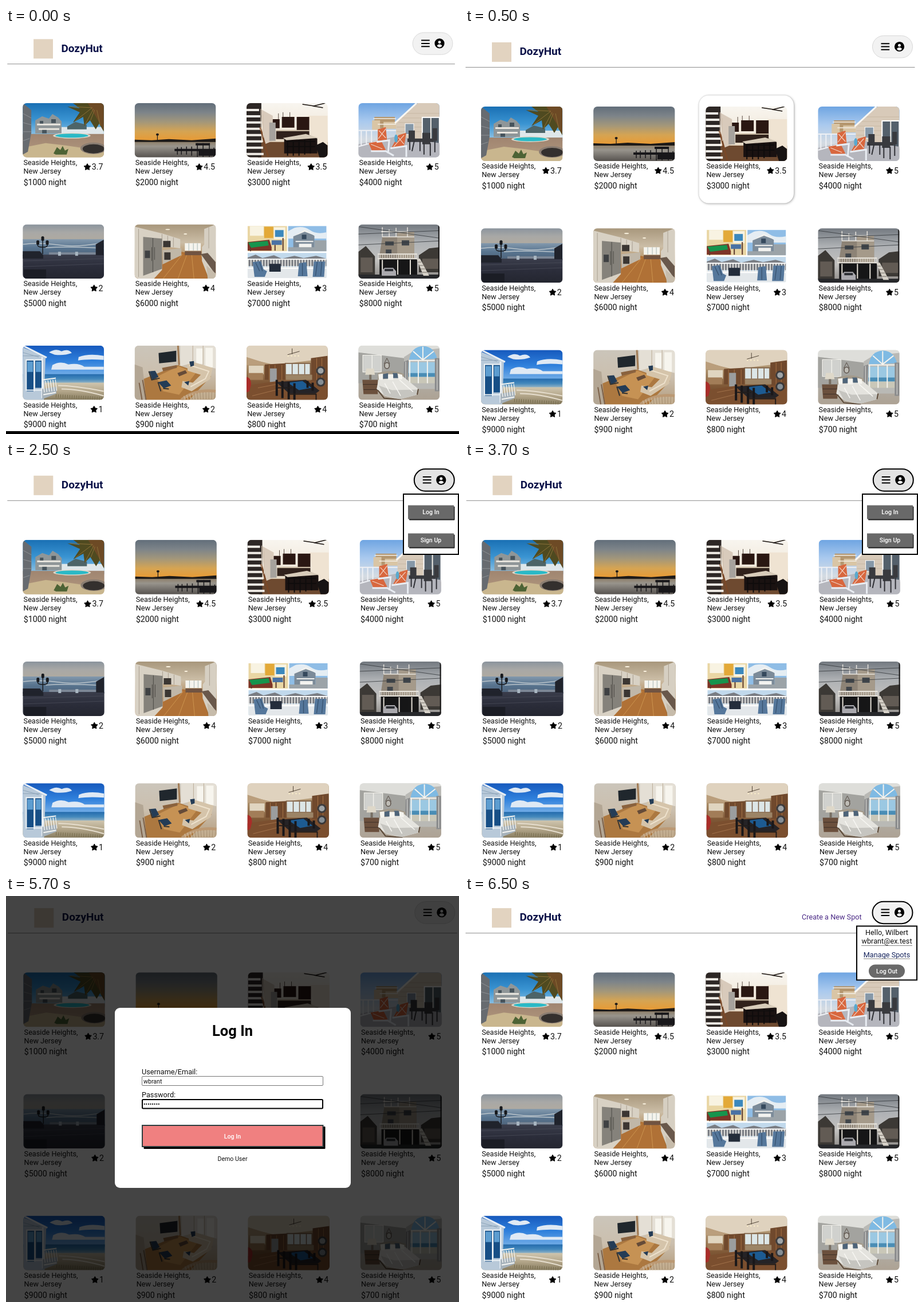
An HTML page that plays this animation: 791 by 708 pixels, repeating every 8 s.

```html
<!DOCTYPE html>
<html lang="en">
<head>
<meta charset="utf-8">
<title>DozyHut</title>
<style>
html, body { margin: 0; width: 100%; height: 100%; overflow: hidden; background: #fff; }
svg { display: block; }
text { font-family: Roboto, sans-serif; font-size: 12.7px; fill: #111; }
.price { font-size: 14.2px; }
.small { font-size: 10.6px; }
.white { fill: #fff; font-weight: 500; }
.mid { text-anchor: middle; }
.end { text-anchor: end; }
.brand { font-size: 19px; font-weight: 700; fill: #0a1148; }
.title { font-size: 25.5px; font-weight: 700; fill: #000; }
.visited { fill: #4b2a86; }
.link { fill: #14235c; }
.card { fill: #fff; filter: drop-shadow(1.5px 1.5px 2px #0004) drop-shadow(0 0 1px #0003); }
.menu { fill: #fff; stroke: #000; stroke-width: 2; }
</style>
</head>
<body>
<svg id="stage" width="791" height="708" viewBox="0 0 791 708"></svg>
<script>
let gradients = 0;
const p = (fill, d) => `<path fill="${fill}" d="${d}"/>`;
const l = (stroke, width, d, dash = '') =>
  `<path fill="none" stroke="${stroke}" stroke-width="${width}" stroke-dasharray="${dash}" d="${d}"/>`;
const box = (x, y, w, h, fill, r = 0, extra = '') =>
  `<rect x="${x}" y="${y}" width="${w}" height="${h}" rx="${r}" fill="${fill}" ${extra}/>`;
const oval = (x, y, rx, ry, fill) => `<ellipse cx="${x}" cy="${y}" rx="${rx}" ry="${ry}" fill="${fill}"/>`;
const text = (x, y, s, cls = '') => `<text x="${x}" y="${y}" class="${cls}">${s}</text>`;
// Full-width band with evenly spaced vertical colour stops
const band = (y, h, ...colors) => {
  const id = 'g' + gradients++;
  const stops = colors.map((c, i) => `<stop offset="${i / (colors.length - 1)}" stop-color="${c}"/>`);
  return `<linearGradient id="${id}" x2="0" y2="1">${stops.join('')}</linearGradient>` +
    box(0, y, 142.5, h, `url(#${id})`);
};

const pool = () => band(0, 60, '#1a70b4', '#3a94d2', '#9ac8e6') +
  p('#dfe7ea', 'M62 42H142V56H62Z') + p('#4d6468', 'M78 41L92 33L112 38V46H78Z') +
  p('#8f9698', 'M22 30L34 23L46 27L52 19L62 25L68 32V53H22Z') + p('#e9e6df', 'M25 36H66V39H25ZM28 44H64V47H28Z') +
  p('#47545c', 'M30 31H36V36H30ZM50 28H58V35H50ZM34 47H42V53H34Z') +
  band(54, 41, '#a08570', '#a98f78', '#c2ac84') + oval(86, 57, 33, 5, '#ded6c8') + oval(86, 57, 29, 3.5, '#2ab9c6') +
  p('#c9b68e', 'M0 78L40 70L75 74L142 84V95H0Z') + oval(124, 79, 23, 10, '#8a7d72') + oval(124, 80, 19, 8, '#34302e') +
  p('#4d6335', 'M54 88L60 77L66 82L70 75L74 83L80 80L77 90H58Z') +
  p('#676b70', 'M0 0L15 12V52L9 85L0 90Z') + l('#8d9094', 1, 'M0 18L15 26M0 34L15 38M0 50H15M0 66L12 62') +
  p('#4f4a20', 'M78 6L100 9L88 0H142V50L134 36L128 46L118 30L108 40L106 24L88 34L100 16Z') +
  p('#6d4a25', 'M114 0H142V48L132 30L126 20Z') + l('#8b7038', 1, 'M122 8L82 6M122 8L92 31M124 10L109 38M126 12L119 30M130 12L136 40');

const sunset = () => band(0, 66, '#626e7a', '#7d8489', '#a3977a', '#d5a453', '#e99a33') +
  band(66, 29, '#8b7a62', '#98948c', '#77736e', '#57534f') +
  p('#1d1a18', 'M0 64L30 65L60 63L100 65L142 62V68H0Z') + l('#1d1a18', 1.2, 'M40 65V55') + oval(40, 55, 2.5, 2, '#1d1a18') +
  p('#18171a', 'M107 70H132V74H107ZM70 80H142V84H70ZM112 84H142V92H112Z') +
  l('#18171a', 1.5, 'M75 77V90M82 77V90M91 76V90M100 76V92M110 70V94M120 70V94M131 70V94M139 78V94');

const darkKitchen = () => band(0, 95, '#f8f5ef', '#f1e8da', '#d8c3a4') +
  p('#6e4a30', 'M24 68H142V95H20Z') + p('#efe3d2', 'M108 22H142V74H118Z') +
  p('#d8cabb', 'M24 10L46 22V66L32 72Z') +
  box(0, 0, 26, 95, '#2d2725') + l('#efebe5', 4, 'M0 12H22M0 23H24M0 34H26M0 45H26M0 56H27M0 67H28M0 78H29M0 89H30') +
  l('#794828', 3, 'M24 42L38 94') + l('#d0c0ad', 1, 'M25 10V48M29 20V60') +
  p('#2a1712', 'M46 28H58V44H46ZM62 24H84V43H62ZM88 24H110V48H88Z') +
  box(40, 34, 11, 32, '#a6a29d') + box(52, 49, 58, 14, '#30211b') + box(52, 47, 58, 2, '#c7b7a0') +
  p('#1a1211', 'M66 62L108 55L124 62V88H66Z') + p('#d8ccba', 'M64 61L104 54L126 61L70 65Z') +
  l('#0f0c0c', 2, 'M72 66V92M82 66V92M92 65V92M102 64V90M112 63V88M70 67H120M70 76H120') +
  p('#171313', 'M121 74L134 68L142 74V95H128Z') + l('#17110e', 1.5, 'M98 2L118 5L138 0M116 5L134 8') + l('#33231a', .8, 'M64 16V30M76 16V28M56 18V28');

const deck = () => band(0, 95, '#6fa5e2', '#a9c9ee', '#d4dbe2', '#bfc0c4') +
  p('#b5976f', 'M28 24H64V44H28Z') + p('#d9c5a5', 'M24 30H38V47H24ZM44 33H70V45H44Z') + l('#f4f0e8', 1.5, 'M26 27H66M34 37H68') +
  p('#d8cab9', 'M66 34L104 0H142V80H66Z') + l('#c4b4a0', .8, 'M84 18H142M76 26H142M70 34H142M67 42H142M67 50H142') +
  l('#faf7f2', 3, 'M64 35L102 0') + box(82, 36, 15, 19, '#8698a8', 0, 'stroke="#fff"') + box(112, 25, 30, 47, '#54606b', 0, 'stroke="#fff" stroke-width="2"') +
  l('#f1eee8', 2, 'M127 25V72') + p('#b5b6bd', 'M0 72L68 58L142 70V95H0Z') +
  l('#eef0f4', 2, 'M0 48L66 48M0 76L36 66M5 47V74M14 47V72M23 48V70') +
  p('#d8673e', 'M34 46L48 42L50 64L34 66ZM70 56L84 52L80 76L58 78ZM18 70L40 66L48 82L24 84Z') +
  l('#f1d4c6', 1.2, 'M36 48L48 61M48 45L35 62M70 60L80 72M80 56L62 76M22 72L42 80') +
  l('#e9edf3', 3, 'M32 68L54 65L52 88M22 84L48 84L62 92M56 79L84 75V94') + oval(66, 62, 3, 7, '#59a9ce') +
  p('#393a3e', 'M88 48H99V66H88ZM112 52H126V72H112ZM130 44H138V66H130ZM86 62H132V68H86Z') +
  l('#303136', 2, 'M90 64V82M98 66L94 84M108 66V84M115 70V90M126 70V92M134 66V86');

const waterfront = () => band(0, 28, '#8b949d', '#a8a8a6', '#b0aaa0') +
  band(26, 30, '#8399ad', '#58748f', '#4e637a') + l('#b9c3ca', 1.5, 'M0 35Q30 31 62 36T142 32M40 41Q80 38 142 42') +
  p('#7c8796', 'M46 49H140V54H46Z') + band(53, 42, '#3a3d4b', '#2b2d3a', '#242630') +
  p('#20232c', 'M0 47L30 47L36 54V60H0ZM128 35L142 27V54H128Z') + l('#4a4c58', .8, 'M0 64L142 60M0 74L142 69') +
  box(2, 79, 39, 16, '#1b1d25') + box(62, 48, 5, 7, '#a9b6c1') + box(92, 48, 5, 7, '#a9b6c1') +
  l('#17191d', 1.5, 'M35 24V52M26 36Q26 40 35 40T43 36') + box(24, 28, 5, 8, '#17191d', 2) + box(32.5, 21, 5, 8, '#17191d', 2) + box(40.5, 28, 5, 8, '#17191d', 2);

const woodKitchen = () => band(0, 95, '#a8977c', '#cbbda6', '#b0844f', '#9a652d') +
  p('#b07136', 'M46 64L82 48L116 54L128 95H34Z') + l('#cc944f', 1, 'M84 52L50 95M92 52L76 95M100 52L104 95') +
  p('#d8d1c4', 'M0 4L48 16L80 26V42L48 38V80L34 95H0Z') + l('#a99f90', 1, 'M7 8V92M48 17V38M58 20V39M68 23V40') +
  p('#85827b', 'M15 22L48 25V78L15 90Z') + l('#54524d', 1.2, 'M32 24V84M30 40V64M35 40V62') + box(18, 46, 9, 13, '#3f4143') +
  p('#c0b7a8', 'M49 45L82 42V54L49 70Z') + p('#3b3632', 'M50 29H63V40H50ZM52 49H63V62H52Z') +
  p('#f4f3ed', 'M88 33H116V46H88Z') + l('#a8b7b6', 1, 'M95 33V46M103 33V46M110 33V46') +
  box(88, 47, 29, 7, '#705341') + p('#d6cfc2', 'M122 8L142 0V95H130L118 64V40L122 35Z') +
  l('#aaa092', 1, 'M130 5V42') + p('#69584b', 'M116 52L128 50L142 66V88Z') + p('#c6bbaa', 'M126 72L142 86V95H128Z') +
  oval(58, 9, 4, 1, '#fff7e4') + oval(89, 17, 3, 1, '#fff7e4');

const collage = () => box(0, 0, 142.5, 95, '#fff') +
  box(2, 3, 69, 44, '#e9d6a4') + p('#f8f3e2', 'M6 3H30V20H6ZM48 5H68V26H48Z') + p('#e3a938', 'M31 4H47V24H31Z') +
  box(50, 10, 15, 12, '#3b88bd') + p('#7d3528', 'M2 31L40 27L44 40V46H2Z') + p('#16944d', 'M3 32L37 29L39 37L8 41Z') +
  p('#4a72a4', 'M44 28H62V36H44Z') + l('#5c392d', 2, 'M50 36V46M64 24V46M7 40V47') +
  box(73, 3, 67, 44, '#8fbde6') + p('#e5edf3', 'M84 6Q100 2 111 10T140 14V25H73V12Z') + p('#7c8b99', 'M82 21L102 10L119 20V42H82Z') +
  p('#f2f2ef', 'M80 22L102 9L121 20L102 13ZM86 29H117V31H86ZM92 34H114V43H92Z') + box(97, 18, 8, 8, '#36495d') + p('#9ba3a8', 'M119 28H140V40H119ZM73 40H140V47H73Z') +
  box(2, 50, 138, 44, '#c1d9ec') + p('#7a7d83', 'M2 58L16 53L28 59L48 54L62 60L84 55L100 59L122 55L140 60V73H2Z') + p('#e3e7ea', 'M2 74H140V94H2Z') +
  l('#fff', 2, 'M2 61H140M2 77H140') + l('#f6f5f0', 15, 'M2 69H140', '1.6 3.4') +
  p('#242d3b', 'M40 69H60V83H40Z') + p('#55779b', 'M11 66L25 64L30 79L36 82L32 92H14ZM92 68L105 66L107 91H90ZM118 65L138 65L136 92H116Z') +
  l('#354f6c', 1.2, 'M16 67L23 82M23 66L28 82M98 68V90M124 66L121 90M132 66L130 90');

const stiltHouse = () => band(0, 95, '#737980', '#aeb1b4', '#c2c1bf', '#8c8986') +
  p('#3c3935', 'M0 48L13 38L29 56V90H0ZM106 54L124 42L142 40V84H106Z') + p('#625b54', 'M4 58H25V84H4ZM112 60H142V78H112Z') +
  p('#8d8376', 'M42 22H98V62H37V54Z') + p('#a59a8a', 'M68 13H98V62H68Z') + l('#e7e3dc', 1.5, 'M42 22H98M40 13H87M42 5V22M54 9V22M66 6V22M86 5V22') +
  p('#40454a', 'M47 30H62V37H47ZM76 28H89V37H76ZM48 44H58V53H48Z') + p('#161617', 'M37 61H103V95H37Z') +
  l('#ece8df', 2, 'M34 60H103M34 52H103') + l('#ded9d0', 8, 'M34 56H103', '1 3') + l('#e4dfd6', 2, 'M42 62V92M69 62V88M91 62V90') +
  p('#27282b', 'M0 88H142V95H0Z') + p('#aaa9ae', 'M41 81L46 76H61L66 82V90H41Z') + box(46, 78, 15, 4, '#2b2d32') +
  p('#d6d1c8', 'M102 60L108 60L124 90H114Z') + l('#756e66', 1, 'M104 66H110M106 72H114M109 78H117M112 84H120') +
  l('#33363a', .8, 'M0 4L142 24M0 17L142 11M0 36L142 29') + l('#1c1b1b', 2, 'M141 2V94');

const beachHouse = () => band(0, 54, '#1659bd', '#2f80dc', '#7ab2e8') +
  p('#dfe9f4', 'M46 12Q58 4 68 10Q80 5 86 13Q72 18 56 16ZM98 20Q116 13 142 18V25Q114 23 97 26ZM52 34Q66 26 80 33Q98 30 108 37L142 37V42H50Z') +
  band(50, 17, '#246bad', '#4388bc', '#a5bdc7') + band(65, 30, '#cfc5ae', '#b3a68a', '#877c60') +
  l('#e6dece', 2, 'M62 70Q90 70 142 80M68 76Q100 76 142 88') + l('#776d4d', 6, 'M58 88L142 93', '1 3') +
  p('#b8c9d9', 'M0 3L40 20L37 95H0Z') + l('#e8eef4', 3, 'M0 0L42 21M34 20V92') + l('#8da4b9', 1, 'M0 12L28 20M0 18H30') +
  p('#174f86', 'M7 26H19V80H7ZM22 26H33V74H22Z') + p('#5d9dd0', 'M8 28H18V46H8ZM23 28H32V46H23Z') + l('#edf2f5', 2, 'M6 25H34V78H6ZM20 25V80') +
  p('#a6b2bb', 'M34 76L59 72V84L34 94Z') + l('#f5f5f2', 2, 'M35 60L58 57M36 86L58 82') + l('#f5f5f2', 20, 'M36 72L59 69', '1.4 3');

const loft = () => band(0, 95, '#cbc5ba', '#cbbfae', '#b39c7d') +
  p('#e4dfd5', 'M80 0H142V40L100 31L80 36Z') + p('#ac7840', 'M12 60L76 34L134 54L96 95H20Z') + p('#c69254', 'M38 55L77 36L107 48L78 86L50 80Z') +
  p('#b3a694', 'M0 33L14 38L20 95H0Z') + l('#a17b55', 3, 'M76 0L78 34') + l('#b9aa94', 1, 'M102 0V32M120 0V36') + p('#f7f5ee', 'M108 5H119V32H108ZM124 4H137V38H124Z') +
  p('#20272d', 'M42 13L73 9V28L43 31Z') + p('#8a623e', 'M48 39L74 34V39L50 45Z') +
  p('#d5c4aa', 'M92 33L104 29L137 39L132 59L100 80L82 73L84 62L102 65L116 51L93 44Z') + l('#eee2cd', 2, 'M96 34L130 45L124 58L98 72') +
  p('#243c56', 'M96 28L104 27L104 35L98 37ZM87 64L96 62L94 70ZM26 45L36 44L42 55L31 60ZM41 64L56 61L64 70L51 75Z') +
  l('#343331', 2, 'M25 45L30 60L44 57M41 64L46 80M50 75L60 76') + p('#654b38', 'M75 48L89 43L92 48L78 54Z') +
  l('#bb9974', 5, 'M82 95Q106 76 142 80') + l('#d4c0a2', 12, 'M88 94Q108 86 142 88', '1 4') + l('#7c6048', 2, 'M14 60L20 95M8 65L13 95');

const dining = () => band(0, 95, '#c9bba5', '#b0946f', '#7f5836', '#5d3f2b') +
  p('#dfd2be', 'M0 0H142V20L112 26L50 34L0 22Z') + p('#ba9e7c', 'M0 20L44 34H0Z') +
  p('#70492d', 'M32 33L68 31V60H32ZM113 22L142 18V72H113Z') + l('#a57346', 1, 'M40 34V60M50 34V60M62 34V60M123 22V68M132 22V68') +
  p('#e0d5c0', 'M4 35H30V50H4Z') + box(3, 48, 26, 12, '#a27d58') + box(41, 40, 12, 24, '#9b9d9e') + p('#dce6e7', 'M69 32H111V50H69Z') +
  l('#795b42', 1.5, 'M68 31H112V51H68ZM80 32V50M91 32V50M102 32V50') + box(69, 51, 46, 9, '#9c8466') +
  p('#7b4f2f', 'M0 70L56 62H142V95H0Z') + l('#a1714a', 1, 'M20 74L62 66M10 88L58 76') +
  p('#252326', 'M52 64L104 60L128 79L121 84H75Z') + p('#1d5b92', 'M72 65L98 62L114 74L92 78Z') +
  l('#191719', 4, 'M53 60V88M63 62V92M74 64V94M84 66V95M107 62V74M116 65V79') + l('#211c1b', 2, 'M55 74H80M76 85H122V95') +
  oval(130, 44, 8, 8, '#3d3c3d') + oval(130, 44, 5, 5, '#a0a4a6') + oval(130, 64, 8, 8, '#393738') + oval(130, 64, 5, 5, '#858d93') +
  p('#a92d29', 'M0 55Q8 56 8 68L5 80L0 82Z') + l('#514537', 1, 'M80 5V15M72 16L93 10') + l('#fff2cc', 2, 'M72 18H92', '2 4');

const bedroom = () => band(0, 95, '#cfd0cd', '#b3b1aa', '#ada294') +
  p('#dededa', 'M0 0H142V6L96 14L80 23L0 12Z') + p('#a3a39f', 'M0 12L80 22V66H0Z') + p('#d0d1ce', 'M9 18H39V45H9Z') +
  l('#f0efea', 1.5, 'M8 17H40V46H8ZM24 17V46') + p('#b9b9b5', 'M80 20L96 10L142 5V76H80Z') +
  p('#7fbae3', 'M89 25Q92 2 114 1Q133 2 138 23Z') + p('#9bc8e2', 'M88 29H136V64H88Z') + p('#4a8db5', 'M88 48H136V55H88Z') + p('#c9c7b8', 'M88 55H136V66H88Z') +
  l('#f4f3ee', 2, 'M88 26H138M90 27V66M105 27V66M121 27V66M136 27V66M113 25V2M113 25L96 10M113 25L132 10') +
  p('#8b8c8d', 'M80 28L88 25L86 68H79ZM134 22H142V80H134Z') + l('#e0dfda', 1, 'M83 28V67M138 24V78') +
  oval(50, 35, 5, 6, '#5b5149') + oval(50, 35, 3.5, 4.5, '#bebcb5') + l('#5b5149', 1, 'M45 32L50 22L55 32') +
  p('#6b503d', 'M7 60H34V85H9Z') + l('#3e3028', 1, 'M8 68H34M9 77H34') + p('#ded8c9', 'M14 40H27L29 51H12Z') + box(19, 51, 4, 9, '#776e62') +
  p('#a39a8b', 'M34 48Q58 40 80 50V69H34Z') + p('#e4e3de', 'M35 60L78 54L105 76L103 86L72 94L46 88L32 76Z') + p('#c6c5c0', 'M36 70L59 78L104 77L102 86L72 94L45 87Z') +
  p('#4e6479', 'M43 50L52 48L53 58H43ZM60 48L68 48L70 57H61Z') + p('#f5f4ef', 'M35 50L43 49V60H36ZM52 50H61V60H52ZM69 49L77 51V59H70Z') +
  l('#f8f7f3', 1.5, 'M46 66L56 84M60 63L74 88M72 60L96 81') + l('#5b4938', 2, 'M34 78L45 92L75 95M103 86L105 76');

const spots = [
  [pool, '3.7', 1000], [sunset, '4.5', 2000], [darkKitchen, '3.5', 3000], [deck, '5', 4000],
  [waterfront, '2', 5000], [woodKitchen, '4', 6000], [collage, '3', 7000], [stiltHouse, '5', 8000],
  [beachHouse, '1', 9000], [loft, '2', 900], [dining, '4', 800], [bedroom, '5', 700]
];

const star = (x, y) => {
  const pts = Array.from({ length: 10 }, (_, i) => {
    const r = i % 2 ? 3.1 : 5.8, a = i * Math.PI / 5;
    return `${(x + r * Math.sin(a)).toFixed(2)},${(y - r * Math.cos(a)).toFixed(2)}`;
  });
  return `<polygon points="${pts.join(' ')}" stroke="#000" stroke-width="1.2" stroke-linejoin="round"/>`;
};

const spot = ([photo, rating, price], i) =>
  `<g transform="translate(${28 + i % 4 * 196.1} ${137 + (i >> 2) * 212.2})">
    <g clip-path="url(#round)">${photo()}</g>` +
  text(1.3, 108.4, 'Seaside Heights,') + text(1.3, 123.4, 'New Jersey') +
  text(1.5, 143.2, `$${price} night`, 'price') + text(140.8, 116.7, rating, 'price end') +
  star(rating.length > 1 ? 113.2 : 125, 112) + '</g>';

const pill = box(711.5, 13.5, 70, 38.5, '#f2f2f2', 19.25, 'id="pill"') +
  l('#000', 2, 'M726.5 27.2H741.2M726.5 32.5H741.2M726.5 37.8H741.2') + oval(758.5, 32.5, 8.6, 8.6, '#000') +
  oval(758.5, 30.3, 2.5, 2.5, '#f2f2f2') +
  p('#f2f2f2', 'M753.9 36.8Q755.2 34.1 757.2 34.1H759.8Q761.8 34.1 763.1 36.8Q758.5 41.8 753.9 36.8Z');

const page = box(408.5, 117.5, 165.5, 188, '#fff', 17, 'id="hover" class="card"') +
  box(47, 25, 34, 34, '#e2d3c0') + text(95.5, 47.2, 'DozyHut', 'brand') +
  l('#8c8c8c', 1, 'M1 68.5H785.5') + pill + spots.map(spot).join('');

const menuButton = (y, label) => box(704, y + 2, 79.5, 24, '#222', 1) + box(702, y, 80, 24, '#696969') +
  text(742, y + 15.5, label, 'small white mid');

const guestMenu = box(694, 56, 96, 105, '#fff', 0, 'class="menu"') + menuButton(75.5, 'Log In') + menuButton(124.5, 'Sign Up');

const login = box(0, 0, 791, 708, '#000b') + box(190, 195, 412, 314, '#fff', 9) +
  text(395.5, 244, 'Log In', 'title mid') + text(237, 311, 'Username/Email:') + text(237, 351, 'Password:') +
  box(237.5, 314.5, 316, 16, '#fff', 1.5, 'stroke="#767676"') + text(240, 326.5, 'wbrant', 'small') +
  box(238, 355, 315, 15.5, '#fff', 1.5, 'stroke="#000" stroke-width="2"') + text(240, 366.8, '•'.repeat(8), 'small') +
  box(240.5, 402, 317, 39, '#000', 1) + box(238, 400, 315.5, 37, '#f08080', 0, 'stroke="#2f3f40" stroke-width="2"') +
  text(395.5, 422.5, 'Log In', 'small white mid') + text(395.5, 462, 'Demo User', 'small mid');

const userMenu = text(588, 41.2, 'Create a New Spot', 'visited') +
  box(684, 52.5, 105, 94, '#fff', 0, 'class="menu"') + text(736.5, 68, 'Hello, Wilbert', 'mid') +
  text(736.5, 83, 'wbrant@ex.test', 'mid') + text(736.5, 107, 'Manage Spots', 'mid link') +
  l('#888', 1, 'M692 86.5H781M696 109.5H777') + box(705, 119.5, 63, 23, '#696969', 11.5) +
  text(736.5, 135, 'Log Out', 'small white mid');

const plain = ['#f2f2f2', '#d8d8d8', 1];
const scenes = [
  { end: 500, at: 'translate(1.3 -5.5) scale(.9963)', pill: plain, over: box(0, 703, 791, 5, '#000') },
  { end: 2500, at: '', pill: plain, over: '', hover: true },
  { end: 4500, at: 'translate(1.3 -1.2)', pill: ['#e3e3e3', '#000', 2], over: guestMenu },
  { end: 6500, at: 'translate(2.3 -3.8)', pill: plain, over: login },
  { end: 8000, at: 'translate(0 -3.8)', pill: ['#f2f2f2', '#000', 2], over: userMenu }
];

const $ = id => document.getElementById(id);
$('stage').innerHTML = `<clipPath id="round">${box(0, 0, 142.5, 95, '#000', 7)}</clipPath><g id="page">${page}</g><g id="over"></g>`;

let shown;
function frame(now) {
  const scene = scenes.find(s => now % 8000 < s.end);
  if (scene !== shown) {
    shown = scene;
    const [fill, stroke, strokeWidth] = scene.pill;
    $('page').setAttribute('transform', scene.at);
    $('hover').style.display = scene.hover ? '' : 'none';
    Object.assign($('pill').style, { fill, stroke, strokeWidth });
    $('over').innerHTML = scene.over;
  }
  requestAnimationFrame(frame);
}
frame(performance.now());
</script>
</body>
</html>
```
